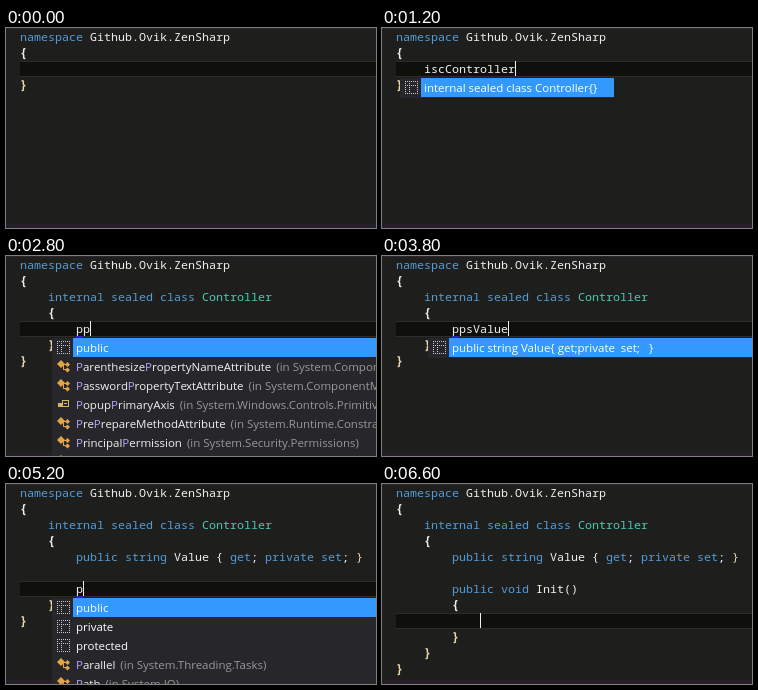
An HTML page with a canvas that plays this animation: 370 px wide and 200 px high, repeating every 7.2 s.

```html
<!DOCTYPE html>
<html lang="en">
<head>
<meta charset="utf-8">
<title>Template expansion</title>
<style>
  html, body { margin: 0; width: 100%; height: 100%; overflow: hidden; background: #1e1f1d; }
  canvas { display: block; width: 370px; height: 200px; }
</style>
</head>
<body>
<canvas id="stage" width="370" height="200"></canvas>
<script>
const ctx = document.getElementById('stage').getContext('2d');
const LOOP = 7200, LEFT = 14, CHAR = 7, LINE = 16, ROW = 19, WIDE = 380;
const CODE_FONT = '11.667px "Noto Sans Mono", "DejaVu Sans Mono", monospace';
const LIST_FONT = '11.5px "Open Sans", "Noto Sans", sans-serif';
const KEYWORDS = /^(namespace|internal|sealed|class|public|string|get|private|set|void)$/;

const head = ['namespace Github.Ovik.ZenSharp', '{'];
const classHead = [...head, '    internal sealed class Controller', '    {'];
const withProp = [...classHead, '        public string Value { get; private set; }', ''];

// A leading * marks a type, # an enum; the rest are templates.
const pItems = ['public', 'private', 'protected',
  '*Parallel (in System.Threading.Tasks)', '*Path (in System.IO)',
  '*PlatformID (in System)', '*Predicate (in System)'];
const ppItems = ['public',
  '*ParenthesizePropertyNameAttribute (in System.ComponentModel)',
  '*PasswordPropertyTextAttribute (in System.ComponentModel)',
  '#PopupPrimaryAxis (in System.Windows.Controls.Primitives)',
  '*PrePrepareMethodAttribute (in System.Runtime.ConstrainedExecution)',
  '*PrincipalPermission (in System.Security.Permissions)',
  '*PropertyPath (in System.Windows)'];

const cls = name => [`internal sealed class ${name}{}`];
const prop = name => [`public string ${name}{ get;private  set;   }`];
const method = name => [`public void ${name}()  {   }`];

// Each stage of the document: code above the edited line, its indent, code below.
const outer = { above: head, indent: 4, below: ['}'] };
const inClass = { above: classHead, indent: 8, below: ['    }', '}'], marked: true };
const afterProp = { above: withProp, indent: 8, below: ['    }', '}'], marked: true };
const inMethod = {
  above: [...withProp, '        public void Init()', '        {'],
  indent: 12, below: ['        }', '    }', '}']
};

const step = (at, doc, typed, caret, items, right) => ({ at, doc, typed, caret, items, right });
const steps = [
  step(0, outer, '', false),
  step(200, outer, 'i', true, ['internal', 'interface', 'implicit', 'int', 'if'], 113),
  step(400, outer, 'is', false, ['internal sealed'], 141),
  step(600, outer, 'isc', false, cls('<name>'), 225),
  step(800, outer, 'iscContr', true, cls('Contr'), 225),
  step(1000, outer, 'iscControlle', true, cls('Controlle'), 229),
  step(1200, outer, 'iscController', true, cls('Controller'), 232),
  step(2200, inClass, '', true),
  step(2600, inClass, 'p', true, pItems, 316),
  step(2800, inClass, 'pp', true, ppItems, WIDE),
  step(3200, inClass, 'pps', true, prop('<name>'), WIDE),
  step(3400, inClass, 'ppsVa', true, prop('Va'), WIDE),
  step(3600, inClass, 'ppsValu', true, prop('Valu'), WIDE),
  step(3800, inClass, 'ppsValue', true, prop('Value'), WIDE),
  step(4800, afterProp, '', false),
  step(5000, afterProp, '', true),
  step(5200, afterProp, 'p', true, pItems, WIDE),
  step(5400, afterProp, 'pmIni', true, method('Ini'), WIDE),
  step(5600, afterProp, 'pmInit', false, method('Init'), WIDE),
  step(6600, inMethod, '', true)
];

function rect(color, x, y, w, h) {
  ctx.fillStyle = color;
  ctx.fillRect(x, y, w, h);
}

function text(str, x, y, color) {
  ctx.fillStyle = color;
  ctx.fillText(str, x, y);
}

function wordColor(word, line) {
  if (KEYWORDS.test(word)) return '#569cd6';
  if (word === 'Controller' && line.includes('class')) return '#4ec9b0';
  return word === '}' ? '#ecd9b0' : '#f0f0f0';
}

function codeLine(str, row) {
  for (const { 0: word, index } of str.matchAll(/\w+|[^\w\s]+/g)) {
    const lone = str.trim() === word && /[{}]/.test(word);
    ctx.font = (lone ? 'bold ' : '') + CODE_FONT;
    text(word, LEFT + index * CHAR, 13 + row * LINE, wordColor(word, str));
  }
}

function templateIcon(x, y) {
  for (let i = 0; i <= 12; i += 2) {
    for (const j of [0, 4, 12]) {
      rect('#c8c8c8', x + i, y + j, 1, 1);
      rect('#c8c8c8', x + j, y + i, 1, 1);
    }
  }
}

function diamond(x, y, r) {
  ctx.beginPath();
  ctx.moveTo(x, y - r);
  ctx.lineTo(x + r, y);
  ctx.lineTo(x, y + r);
  ctx.lineTo(x - r, y);
  ctx.fill();
}

function classIcon(x, y) {
  ctx.fillStyle = '#e2a546';
  diamond(x + 4, y + 4, 4);
  diamond(x + 10.5, y + 4.5, 2.5);
  diamond(x + 10.5, y + 10, 2.5);
  rect('#e2a546', x + 6, y + 4, 3, 1);
  rect('#e2a546', x + 6, y + 5, 1, 5);
  rect('#e2a546', x + 6, y + 9, 3, 1);
}

function enumIcon(x, y) {
  ctx.strokeStyle = '#d9b16a';
  ctx.lineWidth = 1;
  ctx.strokeRect(x + 5.5, y + 2.5, 6, 6);
  rect('#d9b16a', x + 7, y + 5, 3, 1);
  rect('#d9b16a', x + 1, y + 5, 4, 4);
}

// Capitals that match the typed letters are tinted.
function typeLabel(label, x, y, typed) {
  const [name, place] = label.split(' (');
  let hits = 0;
  for (let i = 0; i < name.length; i++) {
    const hit = name[i] === 'P' && hits < typed.length;
    if (hit) hits++;
    text(name[i], x + ctx.measureText(name.slice(0, i)).width, y, hit ? '#b8a6ff' : '#f1f1f1');
  }
  text('(' + place, x + ctx.measureText(name).width + 5, y, '#999999');
}

function popup({ items, right, typed }, x, y) {
  const left = x - 24;
  rect('#27262a', left, y, right - left, items.length * ROW + 1);
  rect('#3399ff', x - 3, y, right - x + 3, ROW);
  ctx.font = LIST_FONT;
  items.forEach((item, i) => {
    const top = y + i * ROW, base = top + 14, label = item.slice(1);
    if (item[0] === '*') classIcon(x - 19, top + 3);
    else if (item[0] === '#') enumIcon(x - 19, top + 3);
    else templateIcon(x - 19, top + 3);
    if (/[*#]/.test(item[0])) typeLabel(label, x, base, typed);
    else text(item, x, base, '#ffffff');
  });
}

function draw(time) {
  const now = steps.findLast(s => s.at <= time);
  const { above, indent, below, marked } = now.doc;
  const row = above.length, top = 1 + row * LINE;
  const x = LEFT + indent * CHAR;

  rect('#1e1f1d', 0, 0, 370, 200);
  rect('#2a262b', 0, 0, 370, 1);
  rect('#241e26', 0, 196, 370, 4);
  rect('#2d2e2b', LEFT, top, 356, 16);
  rect('#0f100c', LEFT, top + 1, 356, 14);

  above.forEach(codeLine);
  below.forEach((str, i) => codeLine(str, row + 1 + i));
  codeLine(' '.repeat(indent) + now.typed, row);
  if (marked && now.typed) rect('#2a22c8', x, top + 15, CHAR, 2);
  if (now.items) popup(now, x, top + 17);
  if (now.caret) rect('#f0f0f0', x + now.typed.length * CHAR, top, 1, 15);
}

function tick() {
  draw(performance.now() % LOOP);
  requestAnimationFrame(tick);
}
tick();
</script>
</body>
</html>
```
